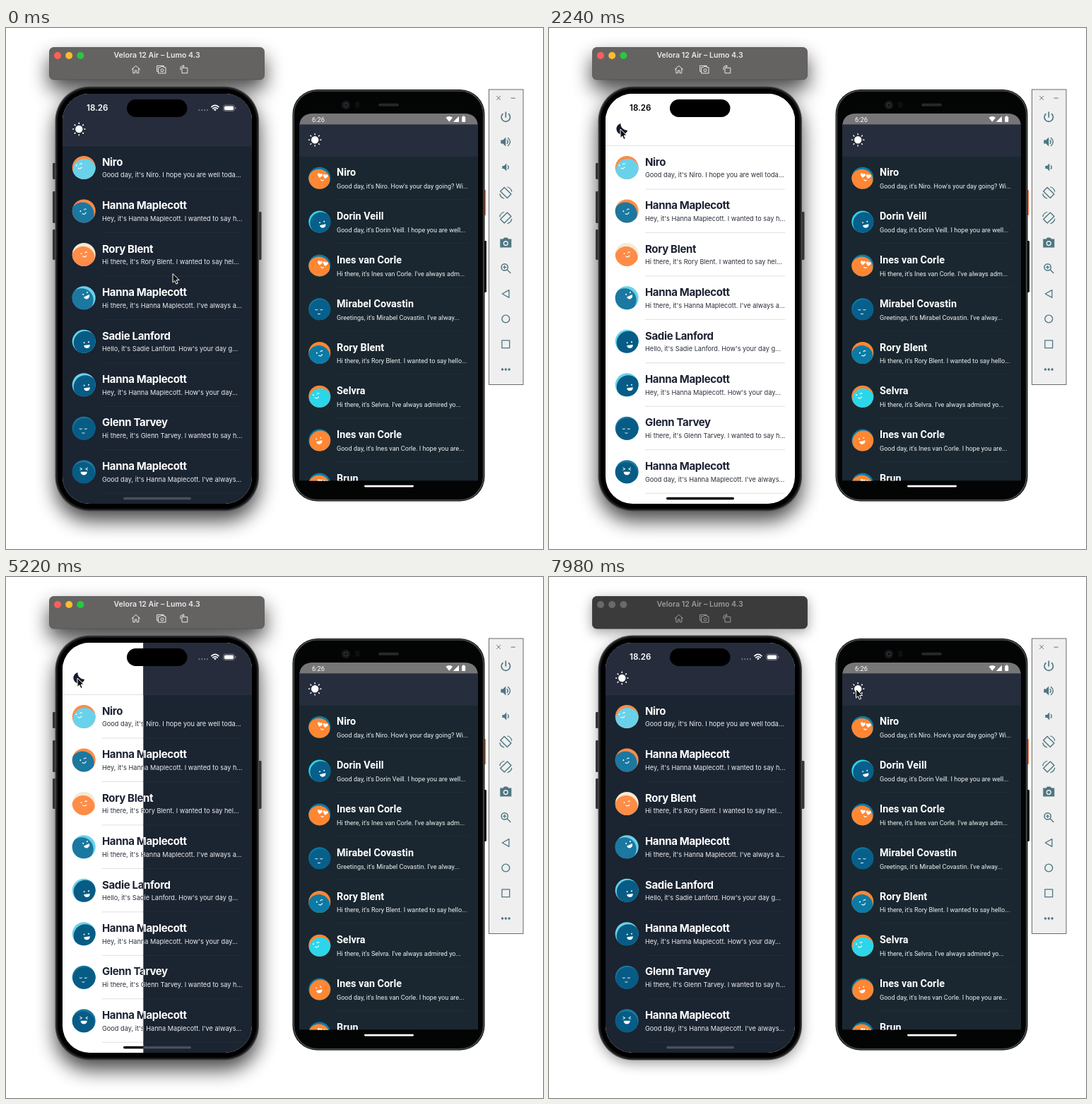
These frames come from a looping animation (760 by 737 pixels, 8 s). An HTML page:

```html
<!DOCTYPE html>
<html lang="en">
<head>
<meta charset="utf-8">
<title>Theme switch</title>
<style>
  html, body { margin: 0; width: 100%; height: 100%; overflow: hidden; background: #fff; }
  svg { display: block; width: 760px; height: 737px; }
  .ios { font-family: Inter, "Noto Sans", sans-serif; }
  .droid { font-family: Roboto, "Noto Sans", sans-serif; }
  .line { fill: none; stroke-linecap: round; stroke-linejoin: round; }
</style>
</head>
<body>
<svg id="stage" viewBox="0 0 760 737" xmlns="http://www.w3.org/2000/svg"></svg>
<script>
const LOOP = 8000;
const rect = (x, y, w, h, r, fill, more = '') =>
  `<rect x="${x}" y="${y}" width="${w}" height="${h}" rx="${r}" fill="${fill}" ${more}/>`;
const circle = (x, y, r, fill, more = '') =>
  `<circle cx="${x}" cy="${y}" r="${r}" fill="${fill}" ${more}/>`;
const line = (d, color, w = 1, more = '') =>
  `<path class="line" d="${d}" stroke="${color}" stroke-width="${w}" ${more}/>`;
const shape = (d, fill, more = '') => `<path d="${d}" fill="${fill}" ${more}/>`;
const text = (x, y, size, weight, fill, str, more = '') =>
  `<text x="${x}" y="${y}" font-size="${size}" font-weight="${weight}" fill="${fill}" ${more}>${str}</text>`;
const at = (x, y, body, rot = 0) => `<g transform="translate(${x} ${y}) rotate(${rot})">${body}</g>`;

// Avatars: a back disc, a shifted front disc and a small white face.
const IOS_COLORS = { o: '#ff8c47', c: '#69d2ea', t: '#1b78a1', d: '#075c86', w: '#f5ead2' };
const DROID_COLORS = { o: '#ff8734', c: '#2dd5ea', t: '#0b7ba6', d: '#075f8b', w: '#f5ead2' };
const W = '#fff';
const heart = (x, y) => at(x, y, shape('M0 3.4L-3.2 0Q-4.2-2.4-2-3Q-.6-3.1 0-1.6Q.6-3.1 2-3Q4.2-2.4 3.2 0Z', W));
const FACES = {
  smile: circle(-3.4, -2, 1, W) + line('M2-2.2q1.5-1.4 3 0', W, 1.1) + line('M-1.8 2.3q2.4 2.8 5 0', W, 1.2),
  open: circle(-3.2, -2.6, 1, W) + circle(3.2, -2.6, 1, W) + shape('M-4.2 1.2H4.4Q4 5.6 0 5.6T-4.2 1.2Z', W),
  shut: line('M-5-2.2q1.6 1.3 3.2 0M2-2.2q1.6 1.3 3.2 0M-1.4 3.7q1.6 .8 3.2 0', W, 1),
  laugh: line('M-5.4-5.4l3 1.5-3 1.5M5.4-5.4l-3 1.5 3 1.5', W, 1) + shape('M-4.6 .2H4.6Q4.2 4.8 0 4.8T-4.6 .2Z', W),
  heart: heart(-4, -2) + heart(4, -2) + line('M-1.4 3.6q1.8 1.8 3.8 0', W, 1.2)
};

function avatar(x, y, r, colors, [pair, dx, dy, kind, fx, fy, rot]) {
  return at(x, y, circle(0, 0, r, colors[pair[0]]) +
    `<g clip-path="url(#disc${r === 16.5 ? 1 : 2})">${circle(dx, dy, r, colors[pair[1]])}</g>` +
    at(fx, fy, FACES[kind], rot));
}

const [HANNA, RORY, INES, NIRO] = ['Hanna Maplecott', 'Rory Blent', 'Ines van Corle', 'Niro'];
const IOS_ROWS = [
  [NIRO, 'Good day', 'I hope you are well toda', ['oc', 1, 4, 'smile', -7, -2, -14]],
  [HANNA, 'Hey', 'I wanted to say h', ['ot', -2, 4, 'smile', -1, 1, -18]],
  [RORY, 'Hi there', 'I wanted to say hel', ['wo', -1, 5, 'smile', 0, 0, -10]],
  [HANNA, 'Hi there', "I've always a", ['ct', -3, 3, 'open', 3, -4, -26]],
  ['Sadie Lanford', 'Hello', "How's your day g", ['cd', 2, 2, 'open', 4, 4, -8]],
  [HANNA, 'Hey', "How's your day", ['cd', 2, 3, 'open', 4, 3, -8]],
  ['Glenn Tarvey', 'Hi there', 'I wanted to say h', ['td', 1, 2, 'shut', -1, 3, 0]],
  [HANNA, 'Good day', "I've always", ['td', -1, 3, 'laugh', 0, 0, 0]]
];
const DROID_ROWS = [
  [NIRO, 'Good day', "How's your day going? Wi", ['to', -1, 3, 'heart', 4, -1, 10]],
  ['Dorin Veill', 'Good day', 'I hope you are well', ['cd', 2, 2, 'open', 4, 3, -14]],
  [INES, 'Hi there', "I've always adm", ['to', -1, 3, 'heart', 4, -1, 10]],
  ['Mirabel Covastin', 'Greetings', "I've alway", ['td', 1, 2, 'shut', -1, 3, 0]],
  [RORY, 'Hi there', 'I wanted to say hello', ['ot', -1, 5, 'smile', 0, 1, -18]],
  ['Selvra', 'Hi there', "I've always admired yo", ['oc', 1, 4, 'smile', -5, -1, -14]],
  [INES, 'Good day', 'I hope you are', ['to', 1, 2, 'open', -1, 0, -14]],
  ['Brun', 'Hi there', "How's your day", ['to', -1, 3, 'heart', 4, -1, 10]]
];
const preview = (name, hello, rest) => `${hello}, it's ${name}. ${rest}...`;

const RAYS = Array.from({ length: 8 }, (_, i) =>
  `<rect x="-.75" y="-9.4" width="1.5" height="2.5" rx=".7" fill="#fff" transform="rotate(${i * 45})"/>`).join('');
const sun = (x, y) => at(x, y, circle(0, 0, 5.2, '#fff') + RAYS);

function iosScreen(dark) {
  const [bg, head, rule, title, sub, bar] = dark
    ? ['#1b2431', '#262c3b', '#232c39', '#fff', '#eceef1', '#4a5059']
    : ['#fff', '#fff', '#dedfe3', '#1c2233', '#2b2f3c', '#000'];
  let out = rect(80, 93, 268, 580, 0, bg) + rect(80, 93, 268, 74, 0, head);
  out += rect(80, 166, 268, 1, 0, dark ? '#293140' : '#e0e1e4');
  out += dark ? sun(103.3, 143)
    : shape('M101.5 135A8 8 0 1 0 111.2 144.7A9 9 0 0 1 101.5 135Z', '#151b2c');
  IOS_ROWS.forEach(([name, hello, rest, face], i) => {
    const y = 197.5 + 61.45 * i;
    out += avatar(110.2, y, 16.5, IOS_COLORS, face) +
      text(136, y - 2.8, 15, 700, title, name, 'letter-spacing="-.34"') +
      text(136, y + 13.9, 9.2, 400, sub, preview(name, hello, rest)) +
      rect(136, y + 30, 198, 1, 0, rule);
  });
  return out + rect(166, 663.7, 96, 3.6, 1.8, bar);
}

function iosPhone() {
  const keys = [[66, 191, 23], [66, 231, 45], [66, 285, 43], [357, 260, 68]]
    .map(([x, y, h]) => rect(x, y, 4.5, h, 1.4, '#343436')).join('');
  return keys +
    rect(69.5, 82.5, 288.5, 601, 49, '#4b4c4f') + rect(70.8, 83.8, 286, 598.4, 48, '#1b1b1d') +
    rect(73, 86, 281.6, 594, 46, '#000') +
    `<g clip-path="url(#iosClip)">${iosScreen(false)}<g clip-path="url(#wipe)">${iosScreen(true)}</g></g>` +
    rect(171, 101, 85.5, 25, 12.5, '#000') +
    text(114, 117.3, 11.6, 600, 'currentColor', '18.26', 'id="clock"') +
    `<g id="icons" fill="currentColor" stroke="none">` +
    [273.4, 277.2, 281, 284.8].map(x => circle(x, 116.2, 1.1, 'currentColor', 'opacity=".35"')).join('') +
    line('M290.9 111.6q5-4.4 10 0M292.8 113.9q3.2-2.7 6.4 0', 'currentColor', 1.7) +
    shape('M293.9 115.2q2-1.5 4 0l-2 2.2Z', 'currentColor') +
    rect(307.6, 109.1, 15.8, 8.4, 2.6, 'none', 'stroke="currentColor" stroke-width=".8" opacity=".45"') +
    rect(308.9, 110.4, 13.2, 5.8, 1.6, 'currentColor') +
    rect(324.3, 111.9, 1.1, 2.8, .5, 'currentColor', 'opacity=".45"') + '</g>';
}

function titleBar() {
  const dots = ['#ff5f57', '#febc2e', '#28c840'].map((c, i) =>
    circle(73 + 16.2 * i, 39, 5, c, `class="light" data-on="${c}"`)).join('');
  return rect(61.5, 27.5, 304, 45.5, 6, '#656362', 'id="bar" stroke-width=".8"') + dots +
    '<g id="barInk">' + text(213.5, 42, 10.6, 600, 'currentColor', 'Velora 12 Air – Lumo 4.3', 'text-anchor="middle"') +
    line('M178 58.6l5.8-5.2 5.8 5.2M179.8 57.4v6.4h2.8v-3.8h2.4v3.8h2.8v-6.4', 'currentColor', 1) +
    line('M215.6 61.4h-2V53.4h9.6v2M216 55.8h2.6l1-1.4h3l1 1.4h2.4v8.2h-10z', 'currentColor', 1) +
    circle(221, 59.8, 2, 'none', 'stroke="currentColor"') +
    line('M249.4 56.4h7.4v7.4h-7.4zM247 59v-3q0-2 2-2h3M250.6 52.4l1.6 1.6-1.6 1.6', 'currentColor', 1) + '</g>';
}

function droidPhone() {
  let out = rect(676, 229, 3.2, 36, 1, '#f0764f') + rect(676, 301, 4, 73, 1.4, '#111') +
    rect(405.5, 87, 272, 582.5, 35, '#060707') +
    rect(407.2, 88.7, 268.6, 579.1, 33.5, 'none', 'stroke="#4d5357" stroke-width="1.5"') +
    rect(410, 91.6, 263, 573.6, 31, '#030404') +
    circle(481, 109, 6.2, '#15181a') + circle(481, 109, 3.4, '#272b2f') + circle(481, 109, 1.5, '#07090b') +
    rect(494, 104, 6.6, 9, 3, '#0d0f10') + rect(527, 106.8, 29, 4, 2, '#25282a');
  out += '<g clip-path="url(#droidClip)">' + rect(415, 121, 253, 519.5, 0, '#1a2730') +
    rect(415, 121, 253, 16, 0, '#767676') + rect(415, 136.4, 253, 45.4, 0, '#262d3d');
  DROID_ROWS.forEach(([name, hello, rest, face], i) => {
    const y = 212.3 + 61.8 * i;
    out += avatar(443.8, y, 15.5, DROID_COLORS, face) +
      text(468, y - 2.9, 14.4, 700, '#fff', name) +
      text(468, y + 14.8, 9.08, 400, '#eef1f2', preview(name, hello, rest)) +
      rect(468, y + 30, 187, .9, 0, '#202e37');
  });
  out += '</g>' + text(433, 132.7, 9.3, 400, '#fff', '6:26') + sun(437.2, 158.3) +
    shape('M622.5 126.8q4.8-3.8 9.6 0l-4.8 6Z', '#fff') + shape('M641 124.8v8.2h-8.2Z', '#fff') +
    rect(645.2, 125.4, 5, 7.6, .8, '#fff') + rect(646.5, 124.4, 2.4, 1.4, 0, '#fff');
  return out + rect(507, 646.8, 70, 2.6, 1.3, '#fff');
}

function toolbar() {
  const c = '#4e7682';
  const ink = (d, w = 1.5) => line(d, c, w);
  const speaker = shape('M-7-2.4h3l4-4v12.8l-4-4h-3Z', c);
  const rotate = ink('M-2.1-7.6L-7.6-2.1 2.1 7.6 7.6 2.1Z', 1.4) + ink('M2.6-8Q7.4-6.6 8.4-2M-2.6 8Q-7.4 6.6-8.4 2', 1.3);
  const items = [
    [126, ink('M0-7V0M-4.3-4.3a6.2 6.2 0 1 0 8.6 0', 1.7)],
    [161, speaker + ink('M2-2.4q2 2.4 0 4.8M3.2-5.6q6 5.6 0 11.2', 1.4)],
    [197, at(1, 0, `<g transform="scale(.85)">${speaker}${ink('M2.4-2.8q2.4 2.8 0 5.6')}</g>`)],
    [233, rotate],
    [268.5, `<g transform="scale(-1 1)">${rotate}</g>`],
    [304, shape('M-8-5.4h4.2l1.6-2h4.4l1.6 2H8V6.6H-8Z', c) + circle(0, .6, 3.6, '#efefef') + circle(0, .6, 2.2, c)],
    [340, circle(-1.6, -1.6, 4.6, 'none', `stroke="${c}" stroke-width="1.5"`) + ink('M2 2l4.6 4.6M-3.6-1.6h4M-1.6-3.6v4', 1.4)],
    [376, ink('M4.6-5.4V5.4L-5 0Z', 1.3)],
    [411.5, circle(0, 0, 5.4, 'none', `stroke="${c}" stroke-width="1.4"`)],
    [447.3, ink('M-5.4-5.4H5.4V5.4H-5.4Z', 1.3)],
    [483, [-4.8, 0, 4.8].map(x => circle(x, 0, 1.7, c)).join('')]
  ];
  return rect(683.5, 87, 48.5, 417.5, 0, '#efefef', 'stroke="#6a6a6a" stroke-width="1"') +
    line('M694.6 96.4l5.2 5.2M699.8 96.4l-5.2 5.2M715 99.2h5.4', '#66757a', 1) +
    items.map(([y, icon]) => at(707.3, y, icon)).join('');
}

const shadow = (id, dy, blur, alpha) =>
  `<g id="${id}" opacity="${alpha}" filter="url(#${blur})">` +
  rect(70, 83 + dy, 288, 600, 49, '#000') + rect(61, 27 + dy, 305, 46, 6, '#000') + '</g>';
const blur = (id, n) =>
  `<filter id="${id}" filterUnits="userSpaceOnUse" x="0" y="0" width="430" height="737"><feGaussianBlur stdDeviation="${n}"/></filter>`;

const $ = id => document.getElementById(id);
$('stage').innerHTML = `<defs>
  <clipPath id="disc1"><circle r="16.5"/></clipPath>
  <clipPath id="disc2"><circle r="15.5"/></clipPath>
  <clipPath id="iosClip"><rect x="80" y="93" width="268" height="580" rx="38"/></clipPath>
  <clipPath id="droidClip"><path d="M415 640.5V141Q415 121 435 121H648Q668 121 668 141V640.5Z"/></clipPath>
  <clipPath id="wipe"><rect id="wipeBox" x="80" y="93" width="268" height="580"/></clipPath>
  ${blur('wide', 14)}${blur('tight', 9)}</defs>` +
  rect(0, 0, 760, 737, 0, '#fff') +
  shadow('shadeOn', 14, 'wide', .72) + shadow('shadeOff', 5, 'tight', .38) +
  `<g class="ios">${titleBar()}${iosPhone()}</g><g class="droid">${droidPhone()}</g>` + toolbar() +
  `<g id="cursor">${shape('M0 0V12.6L2.9 9.9 4.9 14.6 7.2 13.6 5.2 9H9.2Z', '#111', 'stroke="#fff" stroke-width="1" stroke-linejoin="round"')}</g>`;

// Theme switches: start, becomes dark, clock flips, status icons flip.
const SWITCHES = [
  [1620, false, 2040, 2440],
  [3400, true, 3820, 4120],
  [4960, false, 5380, 5660],
  [6320, true, 6740, 7060]
];
const WIPE = 600, BLUR_AT = 7320;
const PATH = [[0, 236, 347.5], [620, 236, 347.5], [1300, 101, 143], [6680, 101, 143],
  [7120, 430, 157], [7880, 430, 157], [7980, 434.5, 158.5]];

const clamp = v => Math.max(0, Math.min(1, v));
const smooth = u => u * u * (3 - 2 * u);
const sweep = u => .74 * u + .26 * smooth(u);

function cursorAt(t) {
  let i = PATH.length - 1;
  while (PATH[i][0] > t) i--;
  const a = PATH[i], b = PATH[i + 1] || a;
  const k = b === a ? 0 : smooth((t - a[0]) / (b[0] - a[0]));
  return [a[1] + (b[1] - a[1]) * k, a[2] + (b[2] - a[2]) * k];
}

function statusColor(t, column) {
  let level = 255;
  for (const s of SWITCHES) {
    const goal = s[1] ? 255 : 0;
    level += (goal - level) * clamp((t - s[column]) / 50);
  }
  const v = Math.round(level);
  return `rgb(${v},${v},${v})`;
}

function setFocus(on) {
  $('shadeOn').style.display = on ? '' : 'none';
  $('shadeOff').style.display = on ? 'none' : '';
  $('bar').setAttribute('fill', on ? '#656362' : '#3c3b3b');
  $('bar').setAttribute('stroke', on ? '#555352' : '#323131');
  $('barInk').style.color = on ? '#e9e8e8' : '#9b9a9a';
  document.querySelectorAll('.light').forEach(d => d.setAttribute('fill', on ? d.dataset.on : '#6a6969'));
}

function draw(t) {
  let left = 80, right = 348;
  const now = SWITCHES.filter(s => s[0] <= t).pop();
  if (now) {
    const edge = 80 + 268 * sweep(clamp((t - now[0]) / WIPE));
    if (now[1]) right = edge; else left = edge;
  }
  $('wipeBox').setAttribute('x', left);
  $('wipeBox').setAttribute('width', right - left);
  $('clock').style.color = statusColor(t, 2);
  $('icons').style.color = statusColor(t, 3);
  $('cursor').setAttribute('transform', `translate(${cursorAt(t).join(' ')})`);
  setFocus(t < BLUR_AT);
}

const start = performance.now();
function tick() {
  draw((performance.now() - start) % LOOP);
  requestAnimationFrame(tick);
}
tick();
</script>
</body>
</html>
```
